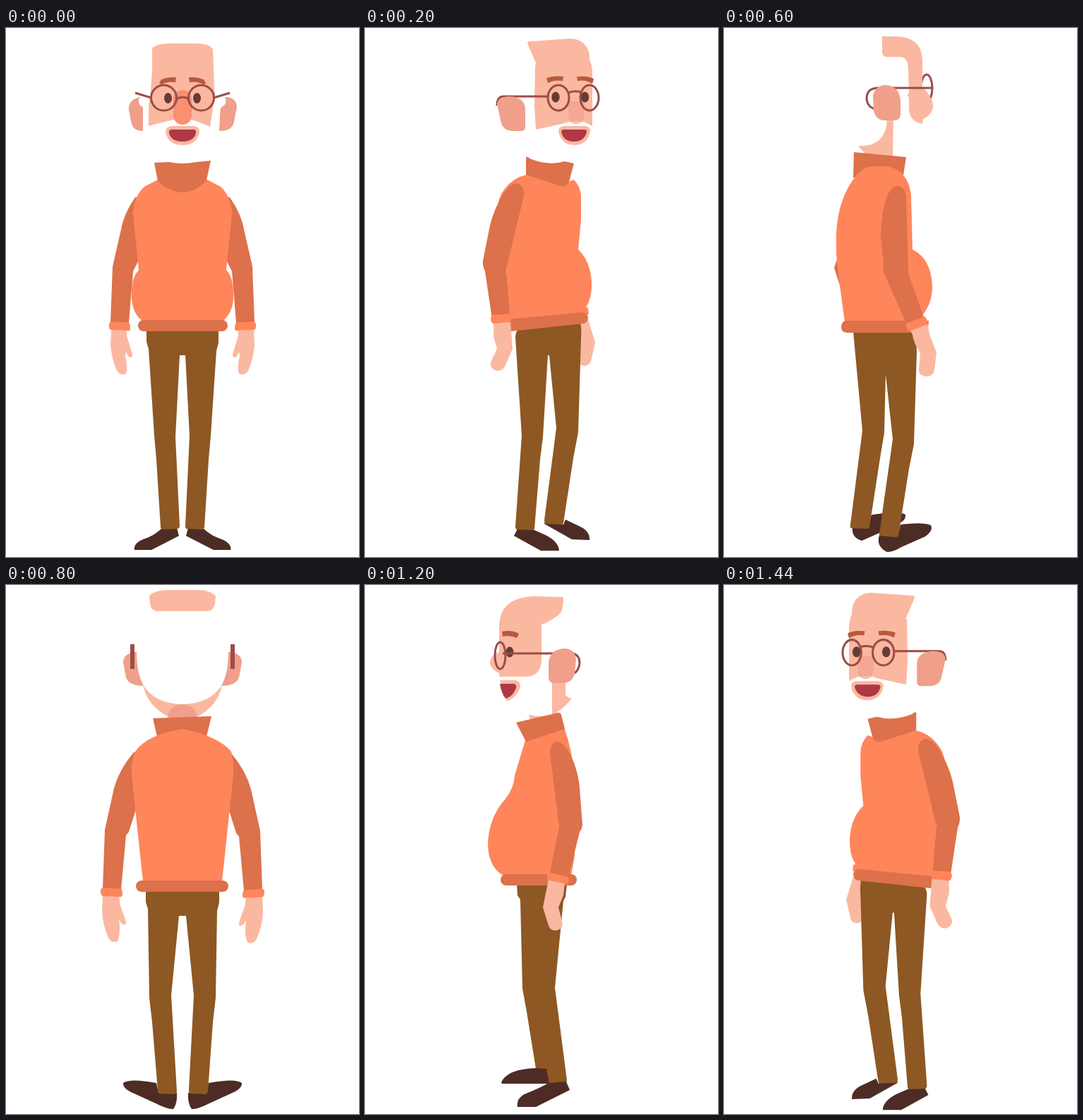
Animation, 500 px wide and 750 px high, one loop 1.6 s. Source, as an HTML page with a canvas:

```html
<!DOCTYPE html>
<html lang="en">
<head>
<meta charset="utf-8">
<title>Turnaround</title>
<style>
html, body { margin: 0; width: 100%; height: 100%; overflow: hidden; background: #fff; }
canvas { display: block; }
</style>
</head>
<body>
<canvas id="stage" width="500" height="750"></canvas>
<script>
const ctx = document.getElementById('stage').getContext('2d');
const SKIN = '#fbb8a0', EAR = '#f09f8b', WOOL = '#ff855b', SHADE = '#dc714b', PANTS = '#8d5823',
  SHOE = '#4e2c26', RIM = '#9b4d47', BROW = '#b65a3d', EYE = '#663c35', LIPS = '#af3845', NOSE = '#fb8f70';
const POSE_MS = 200;

function fill(color, d) {
  ctx.fillStyle = color;
  ctx.fill(new Path2D(d));
}

function line(d, width = 3) {
  ctx.strokeStyle = RIM;
  ctx.lineWidth = width;
  ctx.stroke(new Path2D(d));
}

function oval(x, y, rx, ry, color) {
  ctx.beginPath();
  ctx.ellipse(x, y, rx, ry, 0, 0, Math.PI * 2);
  if (color) {
    ctx.fillStyle = color;
    ctx.fill();
  } else {
    ctx.strokeStyle = RIM;
    ctx.lineWidth = 3;
    ctx.stroke();
  }
}

function pill(color, x, y, w, h, r) {
  ctx.fillStyle = color;
  ctx.beginPath();
  ctx.roundRect(x, y, w, h, r);
  ctx.fill();
}

// Flip around the line whose left and right sides add up to sum, with an optional scale.
function flipped(draw, sum, sx = 1, sy = 1, cy = 0) {
  ctx.save();
  ctx.translate(sum / 2, cy);
  ctx.scale(-sx, sy);
  ctx.translate(-sum / 2, -cy);
  draw();
  ctx.restore();
}

function both(draw) {
  draw();
  flipped(draw, 500);
}

function front() {
  fill(EAR, 'M190 98C178 100 173 108 174 116L177 132C179 142 184 146 194 146V112C186 108 187 102 190 98Z');
  fill(EAR, 'M310 98C321 97 327 104 327 112L323 133C321 142 315 146 302 146L303 126Q303 115 305 112C311 110 313 105 310 98Z');
  fill(SKIN, 'M207 29Q213 22 232 22H270Q288 22 293 30L295 85L296 95L289 140Q278 135 263 130H237Q220 134 202 139V110L205 90L207 60Z');
  pill(NOSE, 237, 88, 26, 49, 13);
  both(() => {
    fill(BROW, 'M217 78L220 73Q230 69 241 70L240 77Q229 75 220 80Z');
    oval(229.5, 99.5, 5.5, 7.5, EYE);
    oval(223.5, 99, 18, 18);
    line('M183 92L206 99');
  });
  line('M241 101Q250 95 259 101');
  fill(SKIN, 'M226 148Q226 140 234 139H266Q275 140 274 148Q270 166 250 166Q230 166 226 148Z');
  fill(LIPS, 'M231 149Q230 144 235 144H265Q270 144 269 149Q266 161 250 161Q234 161 231 149Z');
  both(() => {
    fill(SHOE, 'M221 709H242L245 720L206 740H182Q180 731 194 725Q210 720 221 709Z');
    fill(SKIN, 'M149 428L171 429V436L177 456Q181 465 177 467Q173 468 170 459L169 465Q173 482 170 490Q163 494 157 486Q150 470 148 450Z');
    fill(SHADE, 'M183 240Q166 264 162 290L151 338L148 417L174 418L180 345L186 333L190 325V240Z');
    fill(WOOL, 'M148 416L174 418Q176 419 176 427Q175 430 172 429L149 428Q145 427 146 420Z');
  });
  fill(PANTS, 'M199 428H301V446L298 458L290 578L287 612L281 708Q280 711 278 711L256 710Q254 710 254 706L260 578L254 464H246L240 580L246 707Q245 710 243 710L221 711Q219 710 219 708L213 612L210 578L202 455L199 445Z');
  fill(WOOL, 'M215 215L196 225Q180 240 180 265L188 343Q178 354 178 372V385Q180 406 194 416H306Q320 406 322 385V372Q321 352 312 343L320 265Q320 240 304 225L285 215Z');
  pill(SHADE, 187, 414, 127, 16, 8);
  fill(SHADE, 'M210 191L231 190Q250 194 270 190L290 188L284 216Q268 233 250 233Q232 233 215 217Z');
}

function frontTurn() {
  fill(SKIN, 'M230 21Q230 19 234 19L290 15Q306 15 314 27Q319 36 318 45Q323 56 322 70V139Q310 131 299 132Q290 132 283 135L242 144L240 110L241 52H243L231 24Z');
  pill(EAR + 'b0', 288, 104, 22, 32, [2, 2, 10, 10]);
  fill(BROW, 'M259 78L257 71Q268 67 281 69L280 75Q268 73 259 78ZM300 69Q315 67 324 72L322 79Q313 73 301 75Z');
  oval(270, 98, 5.7, 7.5, EYE);
  oval(311.5, 98, 5.7, 7.5, EYE);
  oval(274, 99, 15, 18);
  oval(318, 99, 13, 18);
  line('M288 92Q296 88 306 91M260 97H196Q187 97 187 110');
  fill(EAR, 'M205 97Q227 98 227 116V140Q227 146 221 146H208Q196 145 193 135L187 108Q188 97 205 97Z');
  fill(SKIN, 'M274 146Q274 140 282 139H312Q320 140 319 147Q315 166 296 166Q277 165 274 146Z');
  fill(LIPS, 'M278 147Q278 144 282 144H310Q315 144 314 148Q310 161 296 161Q281 161 278 147Z');
  fill(SKIN, 'M303 418L316 413L326 446L320 472Q318 479 310 479L304 477Z');
  fill(SHOE, 'M254 703Q256 696 260 697L281 704L284 697L305 707Q319 714 318 726L293 725ZM211 720L216 710L238 711L256 719Q274 728 275 741H249Z');
  fill(PANTS, 'M213 438Q214 428 219 426L305 418Q307 425 306 440L302 573L295 610L281 702Q280 704 278 704L256 703Q254 702 254 698L271 567L261 464H259L252 580L248 612L240 710L238 712L215 711Q213 710 213 707L222 578Z');
  fill(WOOL, 'M229 208Q210 212 198 228Q188 240 187 260L200 340L205 420L309 406L317 406L316 397L313 396Q322 382 321 360Q319 330 302 314L306 272V238Q305 225 296 215L277 222Z');
  fill(SHADE, 'M204 413L308 403Q316 404 316 411Q315 418 309 419L207 430Z');
  fill(SHADE, 'M228 183Q231 182 233 185Q260 196 283 189L296 192L289 218Q286 225 277 224L228 208Z');
  fill(SKIN, 'M182 417L206 415L209 455L199 478Q195 487 186 486Q177 483 178 474L187 455L182 437Z');
  fill(SHADE, 'M215 220Q226 222 225 238L200 341L205 408L187 419H181L170 345Q165 335 168 325L177 280Q183 255 198 232Q206 221 215 220Z');
  fill(WOOL, 'M180 407L205 405L206 417L182 419Q178 418 178 411Z');
}

function side() {
  fill(SKIN, 'M280 17L238 16Q190 18 190 60V95Q177 100 177 110Q178 120 190 125L191 130H230Q250 128 250 105V55H254Q270 46 275 42Q281 36 281 20Z');
  fill(BROW, 'M194 66Q208 63 218 69L215 75Q205 71 195 73Z');
  oval(205, 95, 5.5, 7.5, EYE);
  oval(191.5, 100, 7.5, 19);
  line('M195 97H294Q304 99 304 111Q303 120 297 125');
  fill(SKIN, 'M265 137H284V155Q286 161 293 160Q285 172 272 180L270 188L234 192L232 184Q250 188 265 184Z');
  fill(EAR, 'M283 90Q298 91 299 106L297 125Q294 139 280 139H267Q260 138 260 131V110Q262 91 283 90Z');
  fill(SKIN, 'M191 135H213Q220 136 220 143Q217 158 201 165Z');
  fill(LIPS, 'M191 140H211Q215 141 214 146Q210 158 199 161Q193 153 191 140Z');
  fill(PANTS, 'M215 424H286L284 442L281 448L269 571L286 702Q286 705 283 705L262 707L242 686L229 605L223 572L220 446L216 440Z');
  fill(SHOE, 'M193 705Q202 686 242 685L257 686L261 707H194ZM260 706L285 704L290 716L242 740H216Q214 727 228 721Q250 712 260 706Z');
  fill(WOOL, 'M227 220L282 202Q294 235 296 270L297 384L292 412H196Q175 400 174 368Q175 330 199 303Q211 288 212 270Z');
  pill(SHADE, 192, 410, 108, 16, 8);
  fill(SHADE, 'M214 195L274 181Q277 181 278 184L283 204L228 222Z');
  fill(SKIN, 'M260 417L283 422L281 440L274 457L280 480Q280 489 269 490Q262 489 260 483L252 457Z');
  fill(SHADE, 'M272 222Q285 224 296 252Q303 272 304 288L308 340Q307 347 304 350L288 415L262 408L275 343L262 238Q262 224 272 222Z');
  fill(WOOL, 'M260 407L288 414Q290 420 286 424L258 418Q257 411 260 407Z');
}

function backTurn() {
  oval(287, 85, 8, 19);
  fill(SKIN, 'M224 12H246Q281 14 281 47V83Q297 100 296 112Q294 124 282 129L281 136Q262 133 262 113V97H259L262 92L261 58Q261 44 252 41H230Q224 40 224 34Z');
  line('M296 85H217Q202 86 202 100Q203 112 214 115');
  fill(SKIN, 'M231 129H240L239 184H205L190 167H199Q230 164 231 129Z');
  fill(EAR, 'M211 96Q214 81 229 81Q249 82 250 104V123Q249 131 241 131H226Q215 130 212 117Z');
  fill(SHOE, 'M182 708Q180 722 195 727L220 716L248 702Q258 698 257 690Q250 684 210 690ZM220 719Q215 735 231 743Q240 743 251 736L285 721Q297 712 293 705Q283 700 250 704L247 716Z');
  fill(PANTS, 'M183 430H272L273 460L269 590L262 625L247 720Q246 722 244 722L222 720Q220 720 220 717L239 583L229 491L227 574L221 610L206 708L204 710L180 709Q178 708 179 704L196 571Z');
  fill(SHADE, 'M160 328L156 340L165 368ZM184 176L258 183L254 209L183 212Z');
  fill(WOOL, 'M188 208Q198 196 210 196H233Q262 204 265 238L267 314Q295 328 295 370Q294 392 280 409L264 417H171L164 365L159 320V290Q162 240 188 208Z');
  fill(SHADE, 'M173 415H290L289 425L262 432H174Q166 431 166 424Q166 416 173 415Z');
  fill(SKIN, 'M264 429L288 419L292 437L301 460L298 485Q296 494 286 494Q276 493 276 485L278 461Q268 445 267 435Z');
  fill(SHADE, 'M246 224Q257 225 258 242L261 348L283 410L258 419L227 348Q224 342 226 335L222 292Q224 245 237 228Q240 224 246 224Z');
  fill(WOOL, 'M258 419L284 409Q288 411 288 420L263 430Q257 428 258 419Z');
}

function back() {
  fill(SKIN, 'M203 15Q212 7 230 7H270Q290 7 297 16L296 27Q293 37 285 37H213Q204 35 204 25Z');
  both(() => {
    fill(EAR, 'M183 95Q166 97 166 110L170 131Q174 143 195 143Q185 125 185 95Z');
    fill(RIM, 'M176 84H182V119H176Z');
  });
  fill(SKIN, 'M194 142Q200 171 230 187H270Q300 172 306 142Q288 169 250 169Q212 169 194 142Z');
  fill(EAR, 'M229 188Q231 170 250 169Q269 170 271 188Z');
  fill(SHADE, 'M208 189L291 186L284 215H214Z');
  const arm = () => {
    fill(SKIN, 'M137 440L160 441L162 455Q170 475 170 480Q166 485 160 474Q163 495 158 505Q150 509 145 500Q136 480 136 460Z');
    fill(SHADE, 'M181 237Q160 262 153 288L140 347L137 430L163 432L170 355L174 350L186 312V237Z');
    fill(WOOL, 'M137 429L163 431Q165 432 165 440Q164 443 160 442L137 441Q134 440 134 434Q134 430 137 429Z');
  };
  arm();
  ctx.save();
  ctx.translate(0, 1.5);
  flipped(arm, 500);
  ctx.restore();
  both(() => fill(SHOE, 'M213 706L216 720H242Q243 735 237 743Q230 744 210 734L175 718Q165 712 166 706Q175 699 213 706Z'));
  fill(PANTS, 'M198 433H302V450L299 462L297 585L293 620L286 718L284 722L260 721Q259 720 259 715L266 582L255 469H245L234 582L242 718Q241 722 238 722L217 721Q215 720 215 717L207 620L203 585L201 459L198 450Z');
  fill(WOOL, 'M183 236Q200 212 250 204Q300 214 319 236Q323 250 322 270L306 420H194L178 270Q177 250 183 236Z');
  pill(SHADE, 184, 419, 131, 16, 8);
}

const poses = [
  front,
  frontTurn,
  () => flipped(side, 499.5),
  backTurn,
  back,
  () => flipped(backTurn, 475.5, 1, 1.003, 430),
  side,
  () => flipped(frontTurn, 500, 1.012, 1.01, 420)
];

function frame() {
  const i = Math.floor(performance.now() / POSE_MS) % poses.length;
  ctx.fillStyle = '#fff';
  ctx.fillRect(0, 0, 500, 750);
  poses[i]();
  requestAnimationFrame(frame);
}
frame();
</script>
</body>
</html>
```
